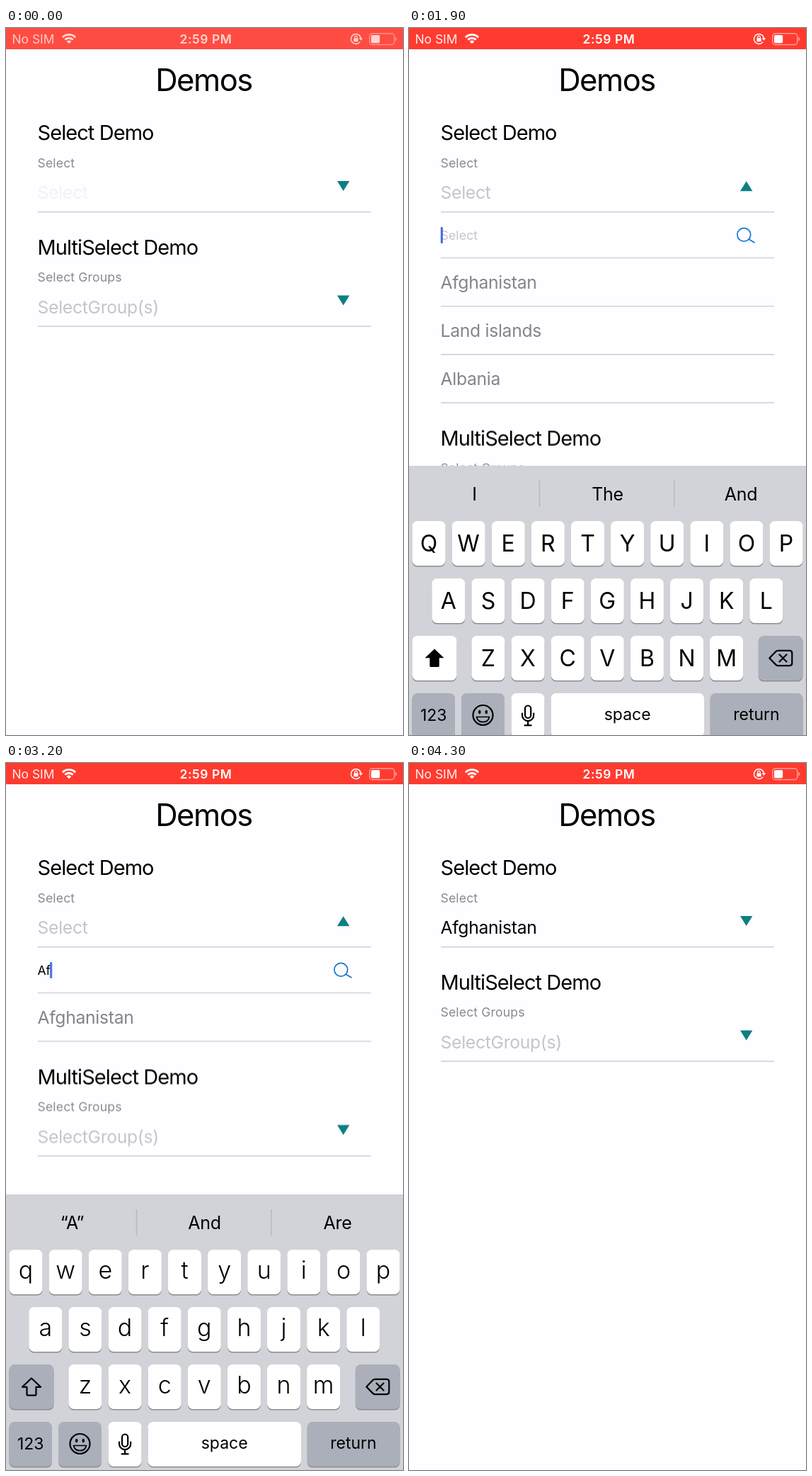
An HTML page for the animation above (5 s loop, 561x998 px).

```html
<!DOCTYPE html>
<html lang="en">
<head>
<meta charset="utf-8">
<title>Select demo</title>
<style>
html, body { margin: 0; width: 100%; height: 100%; overflow: hidden; background: #fefdff; }
svg { display: block; font-family: Inter, "Liberation Sans", sans-serif; }
.title { font-size: 43.5px; letter-spacing: -.033em; }
.head { font-size: 29px; letter-spacing: -.032em; }
.label { font-size: 17.6px; letter-spacing: .008em; fill: #8a8a8e; }
.value { font-size: 24.7px; letter-spacing: -.012em; }
.hint { fill: #c5c5c9; }
.row { fill: #858589; }
.typed { font-size: 17.6px; letter-spacing: -.01em; }
.rule { stroke: #d3d3d8; stroke-width: 1.6; }
.mid { text-anchor: middle; }
.caps { font-size: 32px; }
.small { font-size: 34px; font-weight: 350; }
.word { font-size: 25px; letter-spacing: -.01em; }
.func { font-size: 23px; }
.line { fill: none; stroke: #000; stroke-width: 2.2; stroke-linejoin: round; stroke-linecap: round; }

/* One loop; every pose holds until the next (2% = 100 ms). */
.anim { animation: 5s step-end infinite; }
#bar { animation-name: bar; }
#status { animation-name: status; }
#hint { animation-name: hint; }
#chosen { animation-name: chosen; }
.down { animation-name: closed; }
.up { animation-name: opened; }
#panel { animation-name: panel; }
#rest { animation-name: rest; }
#multi { animation-name: multi; }
#query { animation-name: query; }
#one { animation-name: one; }
#two { animation-name: two; }
#caret { animation-name: caret; }
#keyboard { animation-name: slide; }
.before { animation-name: before; }
.after { animation-name: after; }
.late { animation-name: late; }

@keyframes bar { 0% { fill: #ff4c42 } 2% { fill: #ff4439 } 4%, 100% { fill: #ff3b30 } }
@keyframes status { 0% { opacity: .77 } 2% { opacity: .9 } 4%, 100% { opacity: 1 } }
@keyframes hint { 0% { opacity: .2 } 2% { opacity: .7 } 4% { opacity: 1 } 84%, 100% { opacity: 0 } }
@keyframes chosen { 0% { opacity: 0 } 84%, 100% { opacity: 1 } }
@keyframes closed { 0% { opacity: 1 } 8% { opacity: 0 } 84%, 100% { opacity: 1 } }
@keyframes opened { 0% { opacity: 0 } 8% { opacity: 1 } 84%, 100% { opacity: 0 } }
@keyframes panel { 0% { opacity: 0 } 8% { opacity: .5 } 10% { opacity: .85 } 12% { opacity: 1 } 84%, 100% { opacity: 0 } }
@keyframes rest { 0% { opacity: 1 } 52%, 100% { opacity: 0 } }
@keyframes multi {
  0% { transform: translateY(161.5px) }
  8% { transform: translateY(431px) }
  52% { transform: translateY(295px) }
  84%, 100% { transform: translateY(161.5px) }
}
@keyframes query { 0% { opacity: 1 } 46%, 100% { opacity: 0 } }
@keyframes one { 0% { opacity: 0 } 46% { opacity: 1 } 50%, 100% { opacity: 0 } }
@keyframes two { 0% { opacity: 0 } 50%, 100% { opacity: 1 } }
@keyframes caret {
  0% { opacity: 0; transform: none }
  34% { opacity: 1; transform: none }
  46% { opacity: 1; transform: translateX(11.5px) }
  50% { opacity: 1; transform: translateX(17.3px) }
  68%, 100% { opacity: 0; transform: none }
}
@keyframes slide {
  0% { transform: translateY(998px) }
  34% { transform: translateY(769px) }
  36% { transform: translateY(647px) }
  38% { transform: translateY(618px) }
  40% { transform: translateY(611px) }
  42% { transform: translateY(609px) }
  68% { transform: translateY(642px) }
  70% { transform: translateY(914px) }
  72% { transform: translateY(978px) }
  74% { transform: translateY(993px) }
  76% { transform: translateY(997px) }
  78%, 100% { transform: translateY(998px) }
}
@keyframes before { 0% { opacity: 1 } 48%, 100% { opacity: 0 } }
@keyframes after { 0% { opacity: 0 } 48%, 100% { opacity: 1 } }
@keyframes late { 0% { fill-opacity: .25 } 50% { fill-opacity: .5 } 52%, 100% { fill-opacity: 1 } }
</style>
</head>
<body>
<svg width="561" height="998" viewBox="0 0 561 998">
  <rect id="bar" class="anim" width="561" height="30" fill="#ff3b30"/>
  <g id="status" class="anim" fill="#fff">
    <text x="8.5" y="21.8" font-size="17.4" fill-opacity=".92">No SIM</text>
    <g fill="none" stroke="#fff" stroke-width="2.8">
      <path d="M79.9 13.2a12.9 12.9 0 0 1 18.2 0M83.3 16.6a8.1 8.1 0 0 1 11.4 0"/>
    </g>
    <path d="M89 22.3l-3.3-3.4a4.7 4.7 0 0 1 6.6 0z"/>
    <text class="mid" x="282.5" y="21.8" font-size="17.4" font-weight="600" letter-spacing=".035em">2:59 PM</text>
    <path d="M500.1 19.6A7 7 0 1 1 501.4 14.5" fill="none" stroke="#fff" stroke-width="1.5"/>
    <path d="M498.6 14.2h5.6l-2.8 3.6z"/>
    <rect x="491.4" y="14.2" width="6.2" height="5" rx=".8"/>
    <path d="M492.7 14.5v-1.6a1.8 1.8 0 0 1 3.6 0v1.6" fill="none" stroke="#fff" stroke-width="1.2"/>
    <rect x="513.8" y="7.8" width="35" height="15.6" rx="4" fill="none" stroke="#fff" stroke-width="1.5" opacity=".5"/>
    <rect x="516" y="10" width="12.2" height="11.2" rx="1.8"/>
    <path d="M550.3 12.8a3 3 0 0 1 0 5.6z" opacity=".55"/>
  </g>

  <text class="title mid" x="279.5" y="88.8">Demos</text>

  <text class="head" x="44.5" y="158">Select Demo</text>
  <text class="label" x="44.5" y="196.8">Select</text>
  <text id="hint" class="value hint anim" x="44.5" y="241">Select</text>
  <text id="chosen" class="value anim" x="44.5" y="241">Afghanistan</text>
  <path class="down anim" d="M468 216h17.4l-8.7 14z" fill="#0a8083"/>
  <path class="up anim" d="M468 230.3h17.4l-8.7-14z" fill="#0a8083"/>
  <path class="rule" d="M45 259.6h471"/>

  <g id="panel" class="anim">
    <text id="query" class="label hint anim" style="fill:#c5c5c9" x="44.5" y="298.6">Select</text>
    <text id="one" class="typed anim" x="44.5" y="298.6">A</text>
    <text id="two" class="typed anim" x="44.5" y="298.6">Af</text>
    <rect id="caret" class="anim" x="44.8" y="281" width="3" height="23" rx="1" fill="#4169e6"/>
    <g fill="none" stroke="#1677cf" stroke-width="1.7" stroke-linecap="round">
      <circle cx="473.3" cy="291.8" r="9.4"/>
      <path d="M480.3 298.2l7.6 4.6"/>
    </g>
    <path class="rule" d="M45 324.5h471M45 392.7h471"/>
    <text class="value row" x="44.5" y="368.2">Afghanistan</text>
    <g id="rest" class="anim">
      <text class="value row" x="44.5" y="436.2">Land islands</text>
      <text class="value row" x="44.5" y="504.2">Albania</text>
      <path class="rule" d="M45 460.9h471M45 528.9h471"/>
    </g>
  </g>

  <g id="multi" class="anim">
    <text class="head" x="44.5" y="158">MultiSelect Demo</text>
    <text class="label" x="44.5" y="196.8">Select Groups</text>
    <text class="value hint" x="44.5" y="241">SelectGroup(s)</text>
    <path d="M468 216h17.4l-8.7 14z" fill="#0a8083"/>
    <path class="rule" d="M45 259.6h471"/>
  </g>

  <g id="keyboard" class="anim">
    <rect width="561" height="400" fill="#d1d3d8"/>
    <path d="M184.5 21v37M374.7 21v37" stroke="#b6b9bf" stroke-width="1.5"/>
    <g class="word mid before anim">
      <text x="92.5" y="49">I</text><text x="280.5" y="49">The</text><text x="469" y="49">And</text>
    </g>
    <g class="word mid after anim">
      <text x="93.5" y="49">“A<tspan class="late anim">”</tspan></text>
      <text x="280.5" y="49">An<tspan class="late anim">d</tspan></text>
      <text x="468.5" y="49">A<tspan class="late anim">r</tspan>e</text>
    </g>
    <g id="keys"></g>
    <g class="before anim">
      <path d="M36 258.5l13.5 12.8h-6.8v11.2q0 1.5-1.5 1.5h-10.4q-1.5 0-1.5-1.5v-11.2h-6.8z"/>
    </g>
    <g class="after anim">
      <path class="line" d="M36 259.5l13 12.3h-6.5v10.6q0 1.2-1.2 1.2h-10.6q-1.2 0-1.2-1.2v-10.6h-6.5z"/>
    </g>
    <path class="line" d="M509.3 271.5l9.2-9.4q1.2-1.2 3-1.2h16.3q3.5 0 3.5 3.5v14.2q0 3.5-3.5 3.5h-16.3q-1.8 0-3-1.2zM523.5 266.5l10 10M533.5 266.5l-10 10"/>
    <circle class="line" cx="104.5" cy="352" r="14" stroke-width="2"/>
    <ellipse cx="99.7" cy="347.5" rx="1.8" ry="2.7"/>
    <ellipse cx="109.3" cy="347.5" rx="1.8" ry="2.7"/>
    <path class="line" d="M95.5 354.5h18q-1.4 7.2-9 7.2t-9-7.2z" style="stroke-width:1.7"/>
    <rect class="line" x="164" y="338.5" width="8.2" height="17.5" rx="4.1"/>
    <path class="line" d="M160 349.5v2.5a8.1 8.1 0 0 0 16.2 0v-2.5M168.1 360.3v6M163.6 366.4h9"/>
    <g class="func mid">
      <text x="34.7" y="360">123</text><text x="308.7" y="359">space</text><text x="491" y="359">return</text>
    </g>
  </g>
</svg>
<script>
const PITCH = 56.12, KEY_W = 47, KEY_H = 63;
const rowTop = r => 78 + r * 81;

function key(x, y, w, fill = '#fff', cls = '') {
  const box = (dy, color) =>
    `<rect x="${x}" y="${y + dy}" width="${w}" height="${KEY_H}" rx="7.5" fill="${color}"/>`;
  return `<g class="${cls}">${box(1.6, '#8b8d92')}${box(0, fill)}</g>`;
}

function letters(text, left, row) {
  const y = rowTop(row);
  return [...text].map((c, i) => {
    const x = left + i * PITCH, mid = x + KEY_W / 2;
    return key(x, y, KEY_W) +
      `<text class="caps mid before anim" x="${mid}" y="${y + 43.3}">${c.toUpperCase()}</text>` +
      `<text class="small mid after anim" x="${mid}" y="${y + 40.5}">${c}</text>`;
  }).join('');
}

const GREY = '#abafba';
document.getElementById('keys').innerHTML =
  letters('qwertyuiop', 4.5, 0) +
  letters('asdfghjkl', 32.3, 1) +
  letters('zxcvbnm', 88.4, 2) +
  key(4.5, rowTop(2), 63, '#fff', 'before anim') +
  key(4.5, rowTop(2), 63, GREY, 'after anim') +
  key(493.8, rowTop(2), 62.7, GREY) +
  key(4.5, rowTop(3), 60.5, GREY) +
  key(74, rowTop(3), 61, GREY) +
  key(144.5, rowTop(3), KEY_W) +
  key(200.5, rowTop(3), 216.5) +
  key(425.7, rowTop(3), 130.8, GREY);
</script>
</body>
</html>
```
